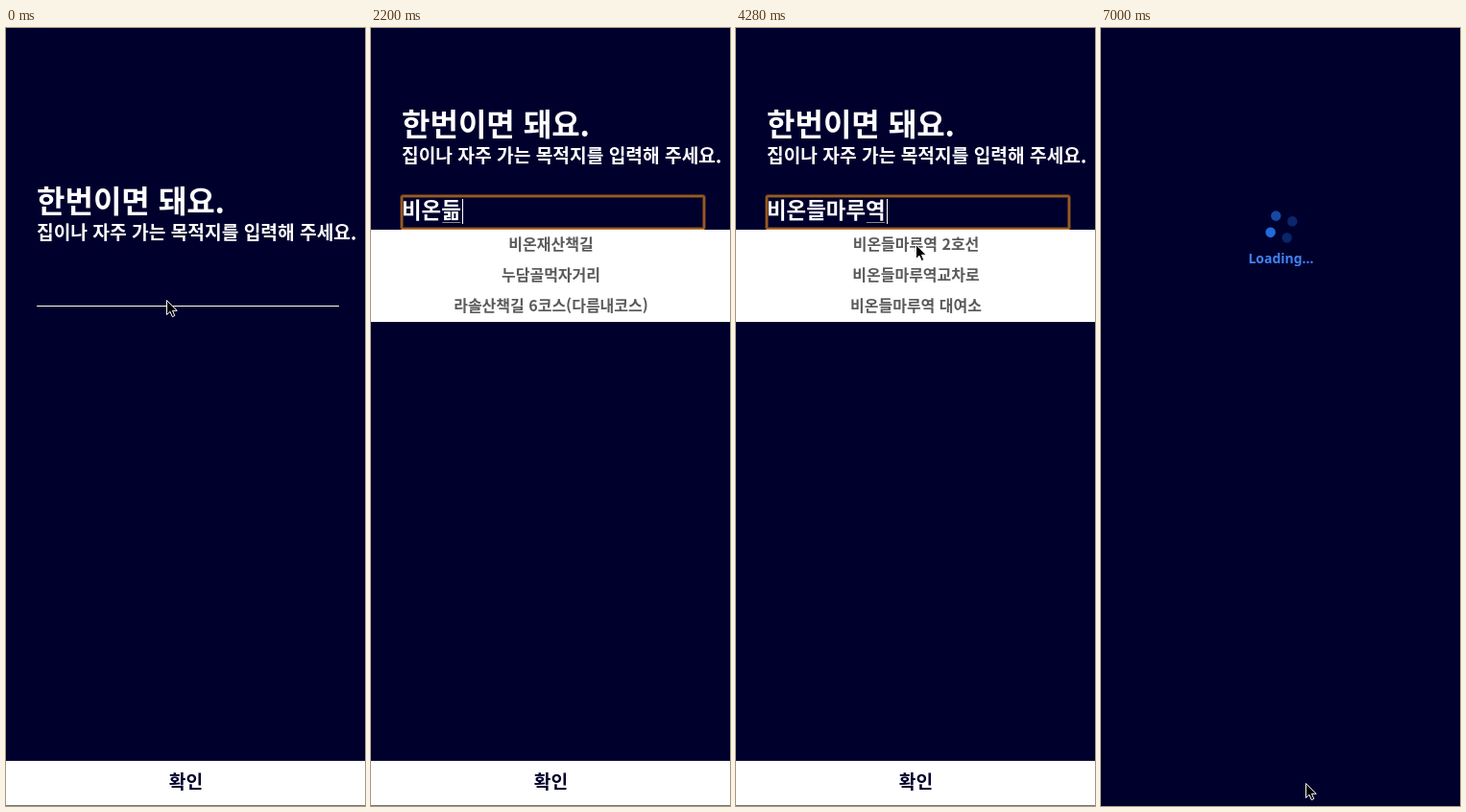
Animation of 374 by 810 pixels, one loop 7.04 s. Source, as an HTML page:

```html
<!DOCTYPE html>
<html lang="ko">
<head>
<meta charset="utf-8">
<style>
  html, body { margin: 0; width: 100%; height: 100%; overflow: hidden; background: #00002d; }
  svg { display: block; width: 374px; height: 810px; }
  text { font: 700 16px "Noto Sans CJK KR", "Noto Sans CJK", sans-serif; fill: #fff; }
  .mid { text-anchor: middle; }
  #title { font-size: 32px; }
  #sub, #button text { font-size: 19.2px; }
  #value { font-size: 22.4px; }
  #button text { fill: #00002d; }
  #list text { fill: #5a5a5a; }
  #loading text { font: 600 14px "Noto Sans", sans-serif; fill: #4082f2; }
  #status text { font: 400 12px Roboto, "Noto Sans CJK KR", sans-serif; fill: #b4b4b4; }
</style>
</head>
<body>
<svg viewBox="0 0 374 810">
  <g id="page">
    <g id="form">
      <text id="title" x="32" y="112">한번이면 돼요.</text>
      <text id="sub" x="32" y="140">집이나 자주 가는 목적지를 입력해 주세요.</text>
      <rect x="32" y="209" width="315" height="1" fill="#fff"/>
      <g id="ring" fill="none" stroke="#b06a1c">
        <rect x="32" y="175" width="315" height="34" rx="1.5" stroke-width="4" opacity=".4"/>
        <rect x="32" y="175" width="315" height="34" rx="1.5" stroke-width="2" opacity=".75"/>
      </g>
      <text id="value" x="32" y="198"></text>
      <rect id="underline" y="202" width="19" height="1" fill="#8b8b8b"/>
      <rect id="caret" y="178" width="1" height="26" fill="#fff"/>
    </g>
    <g id="list">
      <rect y="210" width="374" height="96" fill="#fff"/>
      <text class="mid" x="187.5" y="231"></text>
      <text class="mid" x="187.5" y="263"></text>
      <text class="mid" x="187.5" y="295"></text>
    </g>
    <g id="button">
      <rect y="763" width="374" height="46" fill="#fff"/>
      <rect y="809" width="374" height="1" fill="#777"/>
      <text class="mid" x="187.5" y="792">확인</text>
    </g>
  </g>
  <g id="loading">
    <g id="dots" fill="#257cf8">
      <circle cx="-9" cy="-9" r="5.25"/>
      <circle cx="9" cy="-9" r="5.25"/>
      <circle cx="9" cy="9" r="5.25"/>
      <circle cx="-9" cy="9" r="5.25"/>
    </g>
    <text class="mid" x="187.5" y="244.5">Loading...</text>
  </g>
  <g id="status">
    <path d="M0 791H120Q123 791 123 794V810H0Z" fill="#303032"/>
    <text x="3" y="805">ruvo.example.com의...</text>
  </g>
  <path id="cursor" d="M.5.5V15.5L4 12.3 6.3 17.6 8.8 16.5 6.5 11.3H11.2Z" fill="#000" stroke="#fff"/>
</svg>
<script>
const LOOP = 7040;
const CLICK_INPUT = 80, FIRST_KEY = 1080, MOUSE_BACK = 3760, PICK = 4360, LEAVE = 5960, SPIN = 6190;
const STATION = '비온들마루역';
const SYLLABLE = 20.6;

// Each entry: [time, text in the field]
const typing = [
  [1080, 'ㅂ'], [1120, '비'], [1520, '빙'], [1600, '비오'], [1720, '비온'], [1800, '비온ㄷ'],
  [2000, '비온드'], [2040, '비온들'], [2120, '비온듦'], [2360, '비온들마'], [2480, '비온들말'],
  [2600, '비온들마루'], [2720, '비온들마룽'], [2960, '비온들마루여'], [3240, STATION],
  [PICK, STATION + ' 2호선']
];
const results = [
  [1440, ['달포네', '눌여관', '모퉁공방']],
  [1760, ['비온재산책길', '누담골먹자거리', '라솔산책길 6코스(다름내코스)']],
  [2640, [STATION + ' 2호선', STATION + '교차로', STATION + ' 대여소']]
];
// Each entry: [start, end, x, y] of a pointer move
const moves = [
  [CLICK_INPUT, 600, 185, 269],
  [MOUSE_BACK, 4200, 187, 225],
  [4720, 5225, 213, 786]
];

const $ = id => document.getElementById(id);
const clamp = v => Math.min(1, Math.max(0, v));
const inOut = p => p < .5 ? 4 * p ** 3 : 1 - 4 * (1 - p) ** 3;
const show = (id, on) => $(id).style.display = on ? '' : 'none';
const latest = (entries, t, none) => entries.reduce((found, [at, item]) => t >= at ? item : found, none);
const setText = (node, s) => { if (node.textContent !== s) node.textContent = s; };

// CSS "ease": cubic-bezier(.25, .1, .25, 1)
function ease(p) {
  let lo = 0, hi = 1;
  for (let i = 0; i < 20; i++) {
    const u = (lo + hi) / 2;
    const x = .75 * u * (1 - u) ** 2 + .75 * u * u * (1 - u) + u ** 3;
    if (x < p) lo = u; else hi = u;
  }
  return .3 * lo * (1 - lo) ** 2 + 3 * lo * lo * (1 - lo) + lo ** 3;
}

function drawForm(t) {
  const slide = 80 * (1 - ease(clamp((t - CLICK_INPUT) / 500)));
  $('form').setAttribute('transform', `translate(0 ${slide})`);

  const focused = t >= CLICK_INPUT && t < PICK;
  const value = latest(typing, t, '');
  setText($('value'), value);
  show('ring', focused);
  show('caret', focused && (t < 600 || t >= FIRST_KEY));
  show('underline', focused && value);
  $('caret').setAttribute('x', 33 + Math.round(SYLLABLE * value.length));
  $('underline').setAttribute('x', 33 + SYLLABLE * (value.length - 1));

  const items = latest(results, t, null);
  show('list', items && t < PICK);
  if (items) $('list').querySelectorAll('text').forEach((node, i) => setText(node, items[i]));
}

function drawSpinner(t) {
  const s = Math.max(0, t - SPIN) / 1000;
  $('dots').setAttribute('transform', `translate(188 207) rotate(${45 + 300 * s})`);
  [...$('dots').children].forEach((dot, i) => {
    const phase = Math.max(0, s - .4 * i) % 2;
    dot.setAttribute('opacity', .3 + .7 * (1 - Math.abs(1 - phase)));
  });
}

function drawCursor(t) {
  let x = 167, y = 283;
  for (const [start, end, toX, toY] of moves) {
    const p = inOut(clamp((t - start) / (end - start)));
    x += (toX - x) * p;
    y += (toY - y) * p;
  }
  $('cursor').setAttribute('transform', `translate(${x} ${y})`);
  show('cursor', t < FIRST_KEY || t >= MOUSE_BACK);
}

const begin = performance.now();
function frame() {
  const t = (performance.now() - begin) % LOOP;
  show('page', t < LEAVE);
  show('loading', t >= SPIN);
  show('status', t >= 6240 && t < 6880);
  drawForm(t);
  drawSpinner(t);
  drawCursor(t);
  requestAnimationFrame(frame);
}
frame();
</script>
</body>
</html>
```
